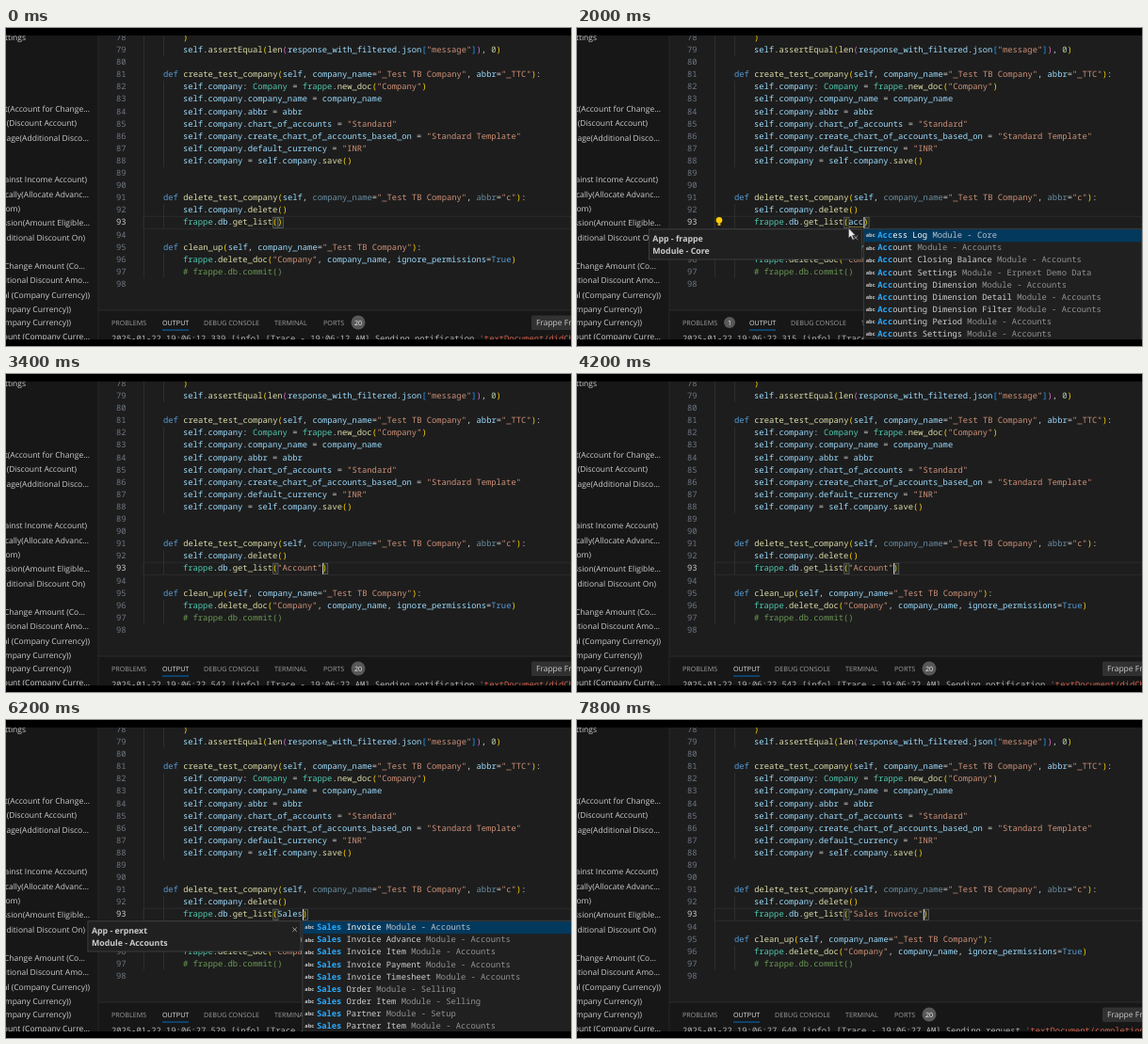
Animation, 600 px wide and 338 px high, one loop 8000 ms. Source, as an HTML page:

```html
<!DOCTYPE html>
<html lang="en">
<head>
<meta charset="utf-8">
<title>Code completion</title>
<style>
html, body { margin: 0; width: 100%; height: 100%; overflow: hidden; background: #000; }
svg { display: block; width: 100vw; height: 100vh; }
text { white-space: pre; text-rendering: geometricPrecision; }
.mono { font: 8.8px "Noto Sans Mono", "DejaVu Sans Mono", monospace; }
.ui { font: 8.5px "Open Sans", "Noto Sans", sans-serif; }
.tab { font: 7.2px "Open Sans", "Noto Sans", sans-serif; }
.doc { font: 700 8.8px "Open Sans", "Noto Sans", sans-serif; }
.icon { font: 700 5.6px "Open Sans", "Noto Sans", sans-serif; }
.hit { fill: #2aaaff; font-weight: 700; }
</style>
</head>
<body>
<svg id="stage" viewBox="0 0 600 338">
  <defs><clipPath id="view"><rect y="8" width="600" height="323"/></clipPath></defs>
  <rect width="600" height="338" fill="#000"/>
  <g clip-path="url(#view)"><g id="back"></g><g id="live"></g></g>
</svg>
<script>
const LOOP = 8000, CHAR = 5.28, PITCH = 13.1, INDENT = 167, BODY = 188;
const ROW = 93, ARG = 289;

const esc = s => s.replace(/&/g, '&amp;').replace(/</g, '&lt;');
const rect = (x, y, w, h, fill, more = '') =>
  `<rect x="${x}" y="${y}" width="${w}" height="${h}" fill="${fill}" ${more}/>`;
const text = (x, y, body, cls, fill, more = '') =>
  `<text x="${x}" y="${y}" class="${cls}" fill="${fill}" ${more}>${body}</text>`;
const span = (s, fill, more = '') => `<tspan fill="${fill}" ${more}>${esc(s)}</tspan>`;
const baseline = n => 26 + (n - 79) * PITCH;
const lineTop = n => baseline(n) - 9.2;

const TOKEN = /#.*|"[^"]*"|\w+|[()\[\]]|[^\w"()\[\]]+/g;
const BRACKETS = ['#ffd700', '#da70d6', '#179fff'];

function highlight(code, faded) {
  let depth = 0;
  return code.replace(TOKEN, (word, at) => {
    let fill = '#d0d0d0';
    if (word[0] === '#') fill = '#6a9955';
    else if (word[0] === '"') fill = '#ce9178';
    else if (/^[(\[]$/.test(word)) fill = BRACKETS[depth++ % 3];
    else if (/^[)\]]$/.test(word)) fill = BRACKETS[Math.max(0, --depth) % 3];
    else if (/^(def|True)$/.test(word)) fill = '#569cd6';
    else if (/^(Company|frappe)$/.test(word)) fill = '#4ec9b0';
    else if (/^\d+$/.test(word)) fill = '#b5cea8';
    else if (/^\w+$/.test(word)) fill = code[at + word.length] === '(' ? '#dcdcaa' : '#9cdcfe';
    const dim = faded && /^(company_name|abbr)$/.test(word);
    return span(word, fill, dim ? 'fill-opacity=".6"' : '');
  });
}

const CODE = {
  78: ')',
  79: 'self.assertEqual(len(response_with_filtered.json["message"]), 0)',
  81: 'def create_test_company(self, company_name="_Test TB Company", abbr="_TTC"):',
  82: 'self.company: Company = frappe.new_doc("Company")',
  83: 'self.company.company_name = company_name',
  84: 'self.company.abbr = abbr',
  85: 'self.company.chart_of_accounts = "Standard"',
  86: 'self.company.create_chart_of_accounts_based_on = "Standard Template"',
  87: 'self.company.default_currency = "INR"',
  88: 'self.company = self.company.save()',
  91: 'def delete_test_company(self, company_name="_Test TB Company", abbr="c"):',
  92: 'self.company.delete()',
  95: 'def clean_up(self, company_name="_Test TB Company"):',
  96: 'frappe.delete_doc("Company", company_name, ignore_permissions=True)',
  97: '# frappe.db.commit()'
};

// label, right edge, baseline
const SIDEBAR = [
  ['ettings', 21, 13], ['t(Account for Change...', 89, 89], ['(Discount Account)', 75, 104],
  ['age(Additional Disco...', 88, 120], ['ainst Income Account)', 86, 164],
  ['cally(Allocate Advanc...', 88, 180], ['om)', 15, 195], ['ssion(Amount Eligible...', 89, 210],
  ['Additional Discount On)', 84, 226], ['Change Amount (Co...', 84, 256],
  ['litional Discount Amo...', 88, 271], ['al (Company Currency))', 89, 287],
  ['mpany Currency))', 69, 302], ['ompany Currency))', 69, 316], ['ount (Company Curre...', 89, 331]
];

function drawBack() {
  let out = rect(0, 8, 98, 323, '#171717') + rect(98, 8, 502, 292, '#1d1d1d') +
    rect(98, 300, 502, 31, '#171717') + rect(97.5, 8, 0.8, 323, '#2b2b2b') +
    rect(98, 299.6, 502, 0.8, '#303030');
  for (const [label, right, y] of SIDEBAR)
    out += text(right, y, label, 'ui', '#cccccc', 'text-anchor="end"');
  out += rect(146, 8, 0.7, lineTop(98) - 8, '#363636');
  for (const [from, to] of [[78, 80], [82, 89], [92, 94], [96, 98]])
    out += rect(INDENT, lineTop(from), 0.7, lineTop(to) - lineTop(from), '#363636');
  out += rect(146, lineTop(ROW), 454, PITCH, 'none', 'stroke="#2e2e2e" stroke-width=".8"');
  for (let n = 78; n <= 98; n++) {
    const y = baseline(n), code = CODE[n];
    out += text(127.5, y, n, 'mono', n === ROW ? '#cccccc' : '#6e7681', 'text-anchor="end"');
    if (code) out += text(code.startsWith('def') ? INDENT : BODY, y, highlight(code, n === 91), 'mono', '#d0d0d0');
  }
  return out;
}

const LISTS = {
  acc: { app: 'frappe', module: 'Core', rows: [
    'Access Log|Core', 'Account', 'Account Closing Balance', 'Account Settings|Erpnext Demo Data',
    'Accounting Dimension', 'Accounting Dimension Detail', 'Accounting Dimension Filter',
    'Accounting Period', 'Accounts Settings'] },
  sales: { app: 'erpnext', module: 'Accounts', rows: [
    'Sales Invoice', 'Sales Invoice Advance', 'Sales Invoice Item', 'Sales Invoice Payment',
    'Sales Invoice Timesheet', 'Sales Order|Selling', 'Sales Order Item|Selling',
    'Sales Partner|Setup', 'Sales Partner Item'] }
};

// Each step overrides the one before; "edit" restarts the caret blink.
const CLOSED = { list: null, bulb: false, badge: false, select: false };
const STEPS = [
  { at: 0, arg: '', edit: -600, stamp: '12.339', note: 'didChange', ...CLOSED },
  { at: 400, arg: 'a', edit: 400, stamp: '21.512' },
  { at: 600, arg: 'ac', edit: 600, stamp: '21.702', list: 'acc', anchor: 2 },
  { at: 1000, arg: 'acc', edit: 1000, stamp: '21.891', badge: true },
  { at: 1400, anchor: 3, stamp: '22.315' },
  { at: 1600, bulb: true },
  { at: 3000, arg: '"Account"', edit: 3000, stamp: '22.542', ...CLOSED },
  { at: 5000, select: true, edit: 5000 },
  { at: 5600, arg: 'S', edit: 5600, stamp: '26.870', select: false },
  { at: 5800, arg: 'Sa', edit: 5800, stamp: '27.035', list: 'sales', anchor: 2 },
  { at: 6000, arg: 'Sal', edit: 6000, stamp: '27.204', anchor: 3 },
  { at: 6200, arg: 'Sales', edit: 6200, stamp: '27.529', anchor: 5 },
  { at: 6400, bulb: true },
  { at: 7400, arg: '"Sales Invoice"', edit: 7400, stamp: '27.640', note: 'completion', ...CLOSED }
];

function stateAt(t) {
  const s = Object.assign({}, ...STEPS.filter(step => step.at <= t));
  s.caret = Math.floor((t - s.edit) / 500) % 2 === 0;
  return s;
}

function drawCall(s) {
  const end = ARG + s.arg.length * CHAR, y = baseline(ROW), up = lineTop(ROW);
  let out = '';
  if (s.select) out += rect(ARG, up + 0.5, end - ARG, PITCH - 0.5, '#2b5884');
  else for (const x of [ARG - CHAR, end])
    out += rect(x, up + 1, CHAR, PITCH - 2, '#252b25', 'stroke="#777" stroke-width=".6"');
  out += text(BODY, y, highlight(`frappe.db.get_list(${s.arg})`), 'mono', '#d0d0d0');
  if (s.list === 'acc' && s.bulb) out += rect(ARG, y + 1.8, end - ARG, 0.7, '#a08a35');
  if (s.caret) out += rect(s.select ? ARG - 0.5 : end - 0.4, up + 0.8, 1, PITCH - 1.4, '#d4d4d4');
  if (s.bulb) out += '<circle cx="151" cy="204.3" r="3.3" fill="#ffcc00"/>' + rect(149.6, 207, 2.8, 3, '#d9ae10');
  return out;
}

function drawPanel(s) {
  const shift = s.badge ? 17 : 0;
  const tab = (x, label, on) => text(x, 315.7, label, 'tab', on ? '#e7e7e7' : '#9d9d9d');
  const badge = (x, r, n) => `<circle cx="${x}" cy="313" r="${r}" fill="#585858"/>` +
    text(x, 315.7, n, 'tab', '#f4f4f4', 'text-anchor="middle"');
  let out = tab(112, 'PROBLEMS') + tab(166 + shift, 'OUTPUT', true) + tab(210 + shift, 'DEBUG CONSOLE') +
    tab(285 + shift, 'TERMINAL') + tab(337 + shift, 'PORTS') + badge(374 + shift, 7.5, 20) +
    rect(166 + shift, 320.6, 28, 0.9, '#0078d4');
  if (s.badge) out += badge(162, 6, 1);
  out += rect(558, 305.5, 50, 15.5, '#313131', 'rx="1.5"') + text(563, 316, 'Frappe Framework', 'ui', '#cccccc');
  const kind = s.note === 'completion' ? 'request' : 'notification';
  return out + text(112, 333.2,
    `2025-01-22 19:06:${s.stamp} [info] [Trace - 19:06:${s.stamp.slice(0, 2)} AM] Sending ${kind} ` +
    span(`'textDocument/${s.note}'`, '#d0604c'), 'mono', '#b4b4b4');
}

function drawList(s) {
  const { app, module, rows } = LISTS[s.list];
  const x = ARG - 0.5 + s.anchor * CHAR, y = 213.8, hit = s.arg.length;
  const frame = 'stroke="#454545" stroke-width=".8"';
  let out = rect(x - 228, y, 226, 32.2, '#202020', frame) +
    text(x - 224, 227, `App - ${app}`, 'doc', '#cccccc') +
    text(x - 224, 240.3, `Module - ${module}`, 'doc', '#cccccc') +
    `<path d="M${x - 10.5} 220.5l4.4 4.4m0-4.4l-4.4 4.4" stroke="#bbb" stroke-width=".8"/>`;
  out += rect(x, y, 295, 130, '#202020', frame) + rect(x + 0.4, y + 0.4, 294.2, 13, '#04395e');
  if (!s.bulb) out += rect(x + 288.2, y + 0.4, 6.4, 118, '#4a4e52');
  rows.forEach((row, i) => {
    const [name, owner = 'Accounts'] = row.split('|'), line = 223.2 + i * PITCH;
    out += text(x + 2.4, line - 0.8, 'abc', 'icon', '#c8c8c8') +
      text(x + 15, line, `<tspan class="hit">${name.slice(0, hit)}</tspan>` +
        span(name.slice(hit), i ? '#d0d0d0' : '#ffffff') +
        span(` Module - ${owner}`, i ? '#929292' : '#b4c2cf'), 'mono', '#d0d0d0');
  });
  if (s.list === 'acc')
    out += '<path d="M288.3 212.5v11l2.5-2.3 1.8 4 1.8-.8-1.8-3.8h3.4z" fill="#e8e8e8" stroke="#111" stroke-width=".6"/>';
  return out;
}

const live = document.getElementById('live');
document.getElementById('back').innerHTML = drawBack();
let shown = '';

function render(t) {
  const s = stateAt(t), key = JSON.stringify(s);
  if (key === shown) return;
  shown = key;
  live.innerHTML = drawCall(s) + drawPanel(s) + (s.list ? drawList(s) : '');
}

const start = performance.now();
function tick() {
  render((performance.now() - start) % LOOP);
  requestAnimationFrame(tick);
}
tick();
</script>
</body>
</html>
```
